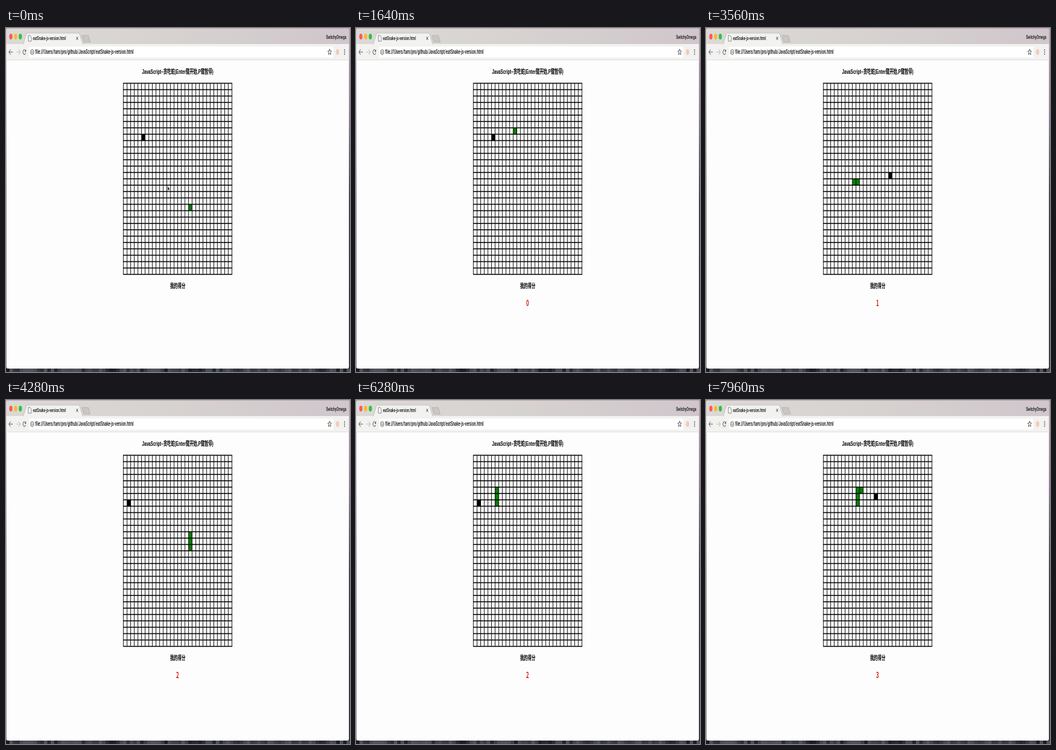
Animation, 600 px wide and 600 px high, one loop 8000 ms. Source, as an HTML page with a canvas:

```html
<!DOCTYPE html>
<html lang="zh">
<head>
<meta charset="utf-8">
<style>
  html, body { margin: 0; width: 100%; height: 100%; overflow: hidden; background: #fdfdfd; }
  canvas { display: block; width: 600px; height: 600px; }
</style>
</head>
<body>
<canvas id="stage" width="600" height="600"></canvas>
<script>
const ctx = document.getElementById('stage').getContext('2d');
const LOOP = 8000, TICK = 60, START_TICK = 8;
const ASPECT = 0.567; // the whole screen is squeezed horizontally
const SANS = 'Roboto, "Liberation Sans", sans-serif';
const CJK = '"Noto Sans CJK SC", "Noto Sans CJK", sans-serif';
const HEADING = 'bold 11.7px "Liberation Sans", ' + CJK;
const PAGE = '#fdfdfd', BAR = '#f2f2f0', INK = '#111', ICON = '#505050';
const GRID = { x: 204.8, y: 96.4, cols: 30, rows: 30, w: 6.307, h: 11.11 };

const ROUTE = 'U12 L7 L9 U4 R3 D4 D8 R13 U3 U5 L12 U2 L1 L2 D4 R3 U6 L5 D6 D1 R8 U5 R1';
const FOODS = [[5, 8], [18, 14], [1, 7], [14, 6]];
const STEP = { U: [0, -1], D: [0, 1], L: [-1, 0], R: [1, 0] };

const trail = [[18, 19]];
for (const leg of ROUTE.split(' ')) {
  const [dx, dy] = STEP[leg[0]];
  for (let n = +leg.slice(1); n > 0; n--) {
    const [x, y] = trail[trail.length - 1];
    trail.push([x + dx, y + dy]);
  }
}

// Score after each step of the trail.
let eaten = 0;
const scores = trail.map(([x, y]) => {
  const [fx, fy] = FOODS[eaten];
  if (x === fx && y === fy) eaten++;
  return eaten;
});

function rect(color, x, y, w, h) {
  ctx.fillStyle = color;
  ctx.fillRect(x, y, w, h);
}

function roundRect(color, x, y, w, h, r) {
  ctx.fillStyle = color;
  ctx.beginPath();
  ctx.roundRect(x, y, w, h, r);
  ctx.fill();
}

function shape(points, fill, stroke, close = true) {
  ctx.beginPath();
  points.forEach(([x, y]) => ctx.lineTo(x, y));
  if (close) ctx.closePath();
  if (fill) { ctx.fillStyle = fill; ctx.fill(); }
  if (stroke) { ctx.strokeStyle = stroke; ctx.stroke(); }
}

function oval(x, y, ry, fill, stroke, from = 0, to = Math.PI * 2) {
  ctx.beginPath();
  ctx.ellipse(x, y, ry * ASPECT, ry, 0, from, to);
  if (fill) { ctx.fillStyle = fill; ctx.fill(); }
  if (stroke) { ctx.strokeStyle = stroke; ctx.stroke(); }
}

function text(str, x, y, font, color, align = 'left') {
  ctx.save();
  ctx.translate(x, y);
  ctx.scale(ASPECT, 1);
  ctx.font = font;
  ctx.fillStyle = color;
  ctx.textAlign = align;
  ctx.textBaseline = 'middle';
  ctx.fillText(str, 0, 0);
  ctx.restore();
}

function gradient(x, y, ...colors) {
  const g = ctx.createLinearGradient(0, 0, x, y);
  colors.forEach((c, i) => g.addColorStop(i / (colors.length - 1), c));
  return g;
}

function drawArrow(x, dir, color) {
  shape([[x, 37.5], [x - 3 * dir, 42], [x, 46.5]], null, color, false);
  shape([[x - 3 * dir, 42], [x + 4 * dir, 42]], null, color, false);
}

function drawDesktop() {
  rect(gradient(0, 600, '#b9a0a8', '#8c7496', '#30323c', '#262a30', '#262a30'), 0, 0, 600, 600);
  for (let i = 0; i < 100; i++) {
    const shade = 25 + 55 * Math.abs(Math.sin(i * i * 1.7));
    rect(`rgb(${shade}, ${shade + 3}, ${shade + 12})`, i * 6, 594, 6, 6);
  }
}

function drawBrowser() {
  drawDesktop();
  roundRect(PAGE, 0.6, 1, 597.6, 593, 3);
  ctx.save();
  ctx.clip();
  rect(gradient(600, 0, '#dbd9d6', '#d6d2d0', '#d0c6cc'), 0, 0, 600, 28);
  rect(BAR, 0, 28, 600, 28);
  roundRect('#fff', 40, 32.5, 531, 19, 2);
  rect('#d2d2d0', 0, 55.5, 600, 0.7);
  ctx.restore();

  ctx.lineWidth = 0.7;
  shape([[30, 28.5], [36, 9], [128, 9], [134, 28.5]], BAR, '#b4b2b0', false);
  shape([[132.5, 13], [143.5, 13], [147, 24.5], [136, 24.5]], '#c9c6c4', '#a9a6a4');
  oval(8.5, 15, 5, '#fc5b57');
  oval(16.8, 15, 5, '#f8b832');
  oval(25, 15, 5, '#32c146');

  shape([[39, 13], [42, 13], [44, 16], [44, 23], [39, 23]], '#fff', ICON);
  text('eatSnake-js-version.html', 47, 18.3, '500 9.1px ' + SANS, INK);
  text('SwitchyOmega', 593.5, 16, '500 9.3px ' + SANS, INK, 'right');
  ctx.lineWidth = 1;
  shape([[122.7, 15.5], [125.7, 20.5]], null, ICON, false);
  shape([[125.7, 15.5], [122.7, 20.5]], null, ICON, false);

  drawArrow(8, 1, ICON);
  drawArrow(22, -1, '#b8b8b6');
  oval(32, 42, 4.3, null, ICON, 0.4, 5.4);
  shape([[35, 37], [35, 41.5], [32.3, 41.5]], ICON);
  oval(45.7, 42, 4.5, null, ICON);
  rect(ICON, 45.2, 41.3, 1, 3.2);
  rect(ICON, 45.2, 39.3, 1, 1.2);
  text('file:///Users/tarn/pro/github/JavaScript/eatSnake-js-version.html', 51, 42.4, '500 10.4px ' + SANS, INK);

  const star = Array.from({ length: 10 }, (_, i) => {
    const r = i % 2 ? 2.3 : 5.3, a = i * Math.PI / 5;
    return [564.5 + r * ASPECT * 1.15 * Math.sin(a), 42 - r * Math.cos(a)];
  });
  shape(star, null, ICON);
  oval(578.3, 42, 5, '#f6c9b8');
  for (const y of [38.3, 42, 45.7]) oval(590.5, y, 1.3, ICON);
}

function drawCell([col, row], color) {
  rect(color, GRID.x + col * GRID.w, GRID.y + row * GRID.h, GRID.w, GRID.h);
}

function drawGrid() {
  const { x, y, cols, rows, w, h } = GRID;
  for (let c = 0; c <= cols; c++) rect('#000', x + c * w - 0.5, y, 1, rows * h);
  for (let r = 0; r <= rows; r++) rect('#000', x - 0.5, y + r * h - 0.8, cols * w + 1, 1.6);
}

function drawCursor(x, y) {
  ctx.lineWidth = 0.6;
  shape([[x, y], [x, y + 9], [x + 1.2, y + 7.4], [x + 2, y + 10], [x + 2.9, y + 9.4],
    [x + 2.1, y + 6.8], [x + 3.7, y + 6.6]], '#000', '#fff');
}

function draw(t) {
  const tick = Math.floor(t / TICK) - START_TICK;
  const step = Math.max(0, Math.min(tick, trail.length - 1));
  const score = scores[step];
  drawBrowser();
  text('JavaScript–贪吃蛇(Enter键开始,P键暂停)', 299.5, 76.6, HEADING, '#000', 'center');
  drawCell(FOODS[score], '#000');
  trail.slice(Math.max(0, step - score), step + 1).forEach(cell => drawCell(cell, '#008000'));
  drawGrid();
  text('我的得分', 299.5, 450.8, HEADING, '#000', 'center');
  if (tick >= 0) text(score, 299.3, 479.8, 'bold 14.5px ' + CJK, '#d8200c', 'center');
  else drawCursor(282, 275);
}

function loop() {
  draw(performance.now() % LOOP);
  requestAnimationFrame(loop);
}
loop();
</script>
</body>
</html>
```
